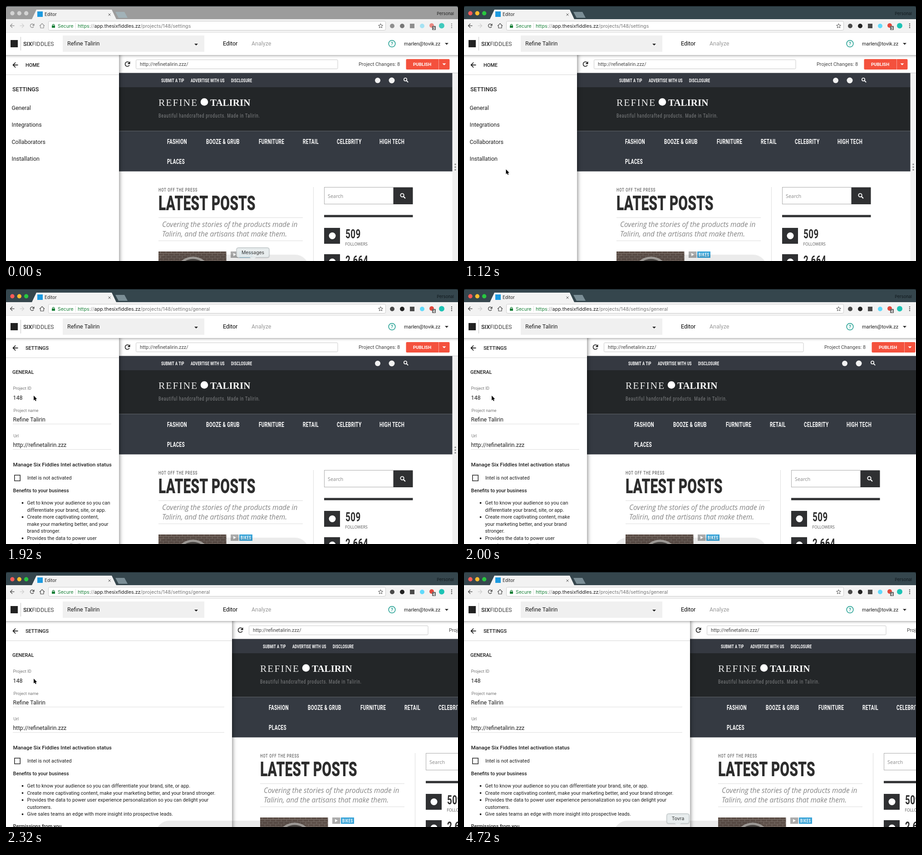
Write an HTML page with a canvas that moves like this. It is 996x562 px and loops after 5200 ms.

```html
<!DOCTYPE html>
<html lang="en">
<head>
<meta charset="utf-8">
<title>Editor settings</title>
<style>
html, body { margin: 0; width: 100%; height: 100%; overflow: hidden; background: #fff; }
canvas { display: block; }
</style>
</head>
<body>
<canvas id="stage" width="996" height="562"></canvas>
<script>
const W = 996, H = 562, LOOP = 5200, STEP = 80;
const ctx = document.getElementById('stage').getContext('2d');
const ROBOTO = 'Roboto, sans-serif', UI = 'Inter, sans-serif', OPEN = '"Open Sans", sans-serif';
const SERIF = '"Liberation Serif", serif';
const INK = '#1d1d1d', DARK = '#2f3032';
const NARROW = 0.67;          // proportion of the condensed display face
const BASE = 249, WIDE = 498; // sidebar widths

// ---- helpers ----
function rect(x, y, w, h, color) {
  ctx.fillStyle = color;
  ctx.fillRect(x, y, w, h);
}
function round(x, y, w, h, r, fill, stroke) {
  ctx.beginPath();
  ctx.roundRect(x, y, w, h, r);
  if (fill) { ctx.fillStyle = fill; ctx.fill(); }
  if (stroke) { ctx.strokeStyle = stroke; ctx.lineWidth = 1; ctx.stroke(); }
}
function dot(x, y, r, color) {
  ctx.beginPath();
  ctx.arc(x, y, r, 0, 7);
  ctx.fillStyle = color;
  ctx.fill();
}
function poly(points, color) {
  ctx.beginPath();
  points.forEach(([x, y]) => ctx.lineTo(x, y));
  ctx.closePath();
  ctx.fillStyle = color;
  ctx.fill();
}
function line(points, color, width = 1) {
  ctx.beginPath();
  points.forEach(([x, y]) => ctx.lineTo(x, y));
  ctx.strokeStyle = color;
  ctx.lineWidth = width;
  ctx.stroke();
}
function ring(x, y, r, color, width, from = 0, to = 7) {
  ctx.beginPath();
  ctx.arc(x, y, r, from, to);
  ctx.strokeStyle = color;
  ctx.lineWidth = width;
  ctx.stroke();
}
function text(str, x, y, size, color = INK, style = '400', family = ROBOTO, align = 'left') {
  ctx.font = `${style} ${size}px ${family}`;
  ctx.textAlign = align;
  ctx.fillStyle = color;
  ctx.fillText(str, x, y);
}
function spaced(gap, draw) {
  ctx.letterSpacing = gap + 'px';
  draw();
  ctx.letterSpacing = '0px';
}
function condensed(str, x, y, size, color, weight = '700', gap = 0) {
  ctx.save();
  ctx.translate(x, y);
  ctx.scale(NARROW, 1);
  spaced(gap, () => text(str, 0, 0, size, color, weight));
  ctx.restore();
}
function shadowed(blur, dx, dy, draw, alpha = 0.42) {
  ctx.save();
  ctx.shadowColor = `rgba(0,0,0,${alpha})`;
  ctx.shadowBlur = blur;
  ctx.shadowOffsetX = dx;
  ctx.shadowOffsetY = dy;
  draw();
  ctx.restore();
}
function shifted(dx, draw) {
  ctx.save();
  ctx.translate(dx, 0);
  draw();
  ctx.restore();
}
function caret(x, y, r, color) {
  poly([[x - r, y - r / 2], [x + r, y - r / 2], [x, y + r / 2]], color);
}
function arrow(x, y, r, color, width, dir = -1) {
  const tip = x + dir * r;
  line([[x - dir * r, y], [tip, y]], color, width);
  line([[x, y - r], [tip, y], [x, y + r]], color, width);
}
function reload(x, y, r, color, width) {
  ring(x, y, r, color, width, 0.5, 5.5);
  poly([[x + r + 1, y - r - 1], [x + r + 1, y], [x, y]], color);
}
function magnifier(x, y, r, color) {
  ring(x - 1, y - 1, r, color, r / 2);
  line([[x + r * 0.5, y + r * 0.5], [x + r * 1.6, y + r * 1.6]], color, r * 0.6);
}

// ---- motion ----
const path = [
  [320, 470, 535], [720, 107, 418], [880, 107, 418], [1520, 61, 235],
  [4080, 61, 235], [4160, 69, 235], [4640, 409, 545]
];
function pointer(t) {
  if (t < 320 || t > 4640) return null;
  const i = Math.max(1, path.findIndex(p => p[0] >= t));
  const [t0, x0, y0] = path[i - 1], [t1, x1, y1] = path[i];
  const u = (t - t0) / (t1 - t0), k = u * u * (3 - 2 * u);
  return { x: x0 + (x1 - x0) * k, y: y0 + (y1 - y0) * k };
}
// cubic-bezier(.4, 0, .2, 1)
function ease(u) {
  let lo = 0, hi = 1;
  for (let i = 0; i < 20; i++) {
    const s = (lo + hi) / 2, q = 1 - s;
    if (1.2 * q * q * s + 0.6 * q * s * s + s * s * s < u) lo = s; else hi = s;
  }
  return lo * lo * (3 - 2 * lo);
}
function sidebarWidth(t) {
  const u = Math.min(1, Math.max(0, (t - 1935) / 385));
  return Math.round(BASE + (WIDE - BASE) * ease(u));
}

// ---- browser window ----
function browser(active, general) {
  const icon = active ? '#4a4a4a' : '#8e8e8e';
  rect(0, 0, W, 29, '#10191d');
  round(0, 1, W, 40, 4, active ? '#35464d' : '#9c9c9c');
  const lights = active ? ['#fc5b57', '#fdbd2e', '#28c840'] : ['#d3d3d3', '#d3d3d3', '#d3d3d3'];
  lights.forEach((c, i) => dot(14 + i * 15.3, 16, 4.7, c));
  poly([[57, 29], [67, 8], [233, 8], [243, 29]], '#f2f2f2');
  poly([[241, 13], [261, 13], [268, 26], [248, 26]], active ? '#7b8e96' : '#a2b2b8');
  rect(69, 12, 12, 12, '#1b9ae0');
  text('Editor', 85, 22, 9.7, '#222', '400', UI);
  line([[225.5, 16.5], [230.5, 21.5]], '#555');
  line([[230.5, 16.5], [225.5, 21.5]], '#555');
  text('Personal', 987, 20, 9.2, active ? '#11191d' : '#222', '400', UI, 'right');

  rect(0, 29, W, 29, '#f2f2f2');
  arrow(14, 43.5, 4.5, icon, 1.3);
  arrow(35, 43.5, 4.5, '#cfcfcf', 1.3, 1);
  reload(57.5, 43.5, 4, icon, 1.3);
  line([[74, 44], [79.5, 38.5], [85, 44]], icon, 1.2);
  line([[76, 43], [76, 48.5], [83, 48.5], [83, 43]], icon, 1.2);
  round(93.5, 33.5, 743, 20, 3, '#fff', '#cbcbcb');
  rect(101, 43, 7, 5, '#188038');
  ring(104.5, 42.5, 2.2, '#188038', 1.2, Math.PI, 2 * Math.PI);
  text('Secure', 114, 48, 10.4, '#188038', '400', UI);
  rect(153, 37, 1, 13, '#ddd');
  const parts = [['https', '#188038'], ['://', '#888'], ['app.thesixfiddles.zz', INK],
    ['/projects/148/settings' + (general ? '/general' : ''), '#777']];
  let x = 158;
  for (const [str, color] of parts) {
    text(str, x, 48, 10.75, color, '400', UI);
    x += ctx.measureText(str).width;
  }
  ctx.beginPath();
  for (let i = 0; i < 10; i++) {
    const a = i * Math.PI / 5 - Math.PI / 2, r = i % 2 ? 2.3 : 5.2;
    ctx.lineTo(825.5 + r * Math.cos(a), 44 + r * Math.sin(a));
  }
  ctx.closePath();
  ctx.strokeStyle = '#555';
  ctx.lineWidth = 1;
  ctx.stroke();

  dot(851, 44, 5, icon);
  dot(873, 44, 5, active ? '#222' : '#777');
  rect(890, 39, 10, 10, icon);
  dot(917, 44, 5, active ? '#61dafb' : '#a5e2f3');
  dot(938, 43, 5, active ? '#e2483d' : '#ea8a83');
  round(939, 44, 8, 9, 1, '#666');
  text(general ? '4' : '3', 943, 51.5, 7.5, '#fff', '700', UI, 'center');
  dot(960, 43.5, 6, active ? '#1cc3b4' : '#40cabd');
  [39.5, 43.5, 47.5].forEach(y => dot(982, y, 1.2, icon));
}

function appHeader() {
  shadowed(6, 0, 1, () => rect(-10, 58, W + 20, 50, '#fff'));
  rect(0, 58, W, 1, '#e2e2e2');
  rect(10, 75, 16, 16, '#222');
  rect(32, 68, 1, 30, '#c4c4c4');
  text('SIX', 38, 88, 12.6, '#222', '500');
  text('FIDDLES', 38 + ctx.measureText('SIX').width, 88, 12.6, '#444');
  rect(125, 65, 312, 36, '#f0f0f0');
  text('Refine Talirin', 135, 87, 12.45);
  caret(419, 85, 4, '#222');
  text('Editor', 478, 87, 12.45, '#000');
  text('Analyze', 541, 87, 12.45, '#999');
  ring(850.5, 83, 7.3, '#159a8c', 1.5);
  text('?', 850.5, 87, 11, '#159a8c', '500', ROBOTO, 'center');
  text('marlen@tovik.zz', 877, 87, 10.9);
  caret(971, 83.5, 4, '#222');
}

// ---- preview ----
function previewBar(dx, far) {
  shifted(dx, () => reload(267.5, 128, 5, '#222', 1.7));
  round(286.5 + dx, 118.5, 444.5 + far - dx, 20, 2, '#fff', '#c9c9c9');
  text('http://refinetalirin.zzz/', 295 + dx, 132, 10.8, '#444');
  shifted(far, () => {
    text('Project Changes: 8', 777, 132, 10.9, '#444');
    round(881.5, 117, 96, 23, 2, '#f4513d');
    rect(953, 117, 1, 23, '#f9a399');
    text('PUBLISH', 917, 132, 9.8, '#fff', '700', ROBOTO, 'center');
    caret(965.5, 128.5, 4, '#fff');
  });
}

function photo() {
  ctx.save();
  ctx.beginPath();
  ctx.rect(336, 541, 149.5, 21);
  ctx.clip();
  rect(336, 541, 150, 21, '#5b4d46');
  for (let row = 0; row < 5; row++) {
    const y = 541 + row * 5;
    rect(336, y + 4, 150, 1, '#7b7069');
    for (let x = 340 + row % 2 * 6; x < 486; x += 12) rect(x, y, 1, 4, '#7b7069');
  }
  dot(412, 592, 38, '#4e4a47');
  ring(412, 592, 37, '#aaa6a2', 5);
  ctx.restore();
}

function site(mid, far) {
  const bars = [[147.5, 31.5, '#353941'], [179, 96.5, '#232628'], [275.5, 89, '#353a42']];
  rect(BASE, 147.5, W - BASE, H - 147.5, '#fff');
  bars.forEach(([y, h, c]) => rect(BASE, y, W - BASE, h, c));
  shifted(mid, () => {
    const links = [['SUBMIT A TIP', 342], ['ADVERTISE WITH US', 407], ['DISCLOSURE', 496]];
    links.forEach(([label, x]) => condensed(label, x, 168, 11.4, '#fff', '700', 0.2));
    dot(819, 164, 6, '#f2f2f2');
    dot(850, 164, 6.5, '#f2f2f2');
    magnifier(881, 163, 3.2, '#fff');

    spaced(2, () => text('REFINE', 336, 220, 21.5, '#eee', '400', SERIF));
    dot(437, 211.5, 8.3, '#fff');
    text('TALIRIN', 450, 220, 21, '#fff', '700', SERIF);
    condensed('Beautiful handcrafted products. Made in Talirin.', 336, 246, 13, '#707274', '500', 1.2);

    const menu = [['FASHION', 355], ['BOOZE & GRUB', 441], ['FURNITURE', 557],
      ['RETAIL', 654], ['CELEBRITY', 729], ['HIGH TECH', 823]];
    menu.forEach(([label, x]) => condensed(label, x, 303.5, 15, '#fff', '700', 0.5));
    condensed('PLACES', 355, 348, 15, '#fff', '700', 0.5);

    condensed('HOT OFF THE PRESS', 336, 409, 11.5, '#666', '500', 1.2);
    condensed('LATEST POSTS', 336, 449.5, 45, '#2d2d2d', '900');
    rect(336, 466, 318, 1, '#ddd');
    rect(336, 517, 318, 1, '#ddd');
    text('Covering the stories of the products made in', 344, 487, 15.4, '#858585', 'italic 400', OPEN);
    text('Talirin, and the artisans that make them.', 344, 508, 15.4, '#858585', 'italic 400', OPEN);
    photo();
    rect(495, 541, 17.5, 14, '#ababab');
    poly([[501, 544.5], [507, 548], [501, 551.5]], '#fff');
    rect(514, 541, 29, 14, '#39a4d8');
    condensed('BIKES', 517, 552, 10.5, '#fff', '700', 1.3);

    rect(677, 399, 1, H - 399, '#ddd');
    ctx.strokeStyle = '#aaa';
    ctx.lineWidth = 1;
    ctx.strokeRect(701.5, 399.5, 194, 37);
    text('Search', 709, 423, 10.9, '#888', '400', OPEN);
    rect(853.5, 400, 43, 37, DARK);
    magnifier(874, 418, 3.7, '#fff');
    rect(701, 460.5, 195.5, 5, DARK);
    rect(701, 489, 35, 35, DARK);
    dot(719, 506.5, 7.5, '#fff');
    condensed('509', 748, 511.5, 28, '#2d2d2d', '700', 0.8);
    text('FOLLOWERS', 747.5, 528, 8.6, '#555', '400', OPEN);
    rect(701, 547, 35, 35, DARK);
    dot(719, 564, 7.5, '#fff');
    condensed('2,664', 748, 570, 28, '#2d2d2d', '700', 0.8);
  });
  shifted(far, () => {
    rect(983.5, 147.5, 300, H - 147.5, '#f1f1f1');
    [349, 355, 361].forEach(y => dot(990, y, 1.7, '#888'));
  });
}

// ---- sidebar ----
const menuItems = ['General', 'Integrations', 'Collaborators', 'Installation'];
const benefits = [
  'Get to know your audience so you can differentiate your brand, site, or app.',
  'Create more captivating content, make your marketing better, and your brand stronger.',
  'Provides the data to power user experience personalization so you can delight your customers.',
  'Give sales teams an edge with more insight into prospective leads.'
];

function wrap(str, width) {
  const lines = [''];
  for (const word of str.split(' ')) {
    const last = lines[lines.length - 1], next = last ? last + ' ' + word : word;
    if (last && ctx.measureText(next).width > width) lines.push(word);
    else lines[lines.length - 1] = next;
  }
  return lines;
}

function settingsMenu(hover) {
  text('SETTINGS', 14, 188, 12.45, INK, '500');
  menuItems.forEach((label, i) => {
    if (i === hover) rect(0, 206 + i * 37.4, BASE, 37.4, '#ebebeb');
    text(label, 12.5, 229 + i * 37.4, 12.45);
  });
}

function generalForm(w) {
  const right = w - 17;
  text('GENERAL', 14, 187, 10.9, INK, '500');
  text('Project ID', 15.5, 222, 9.34, '#777');
  text('148', 15.5, 244, 12.45);
  text('Project name', 16.5, 271, 9.34, '#777');
  text('Refine Talirin', 15.5, 292, 12.45);
  rect(15, 297, right - 15, 1, '#dedede');
  text('Url', 16.5, 327, 9.34, '#777');
  text('http://refinetalirin.zzz', 15.5, 348, 12.45);
  rect(15, 353, right - 15, 1, '#dedede');
  text('Manage Six Fiddles Intel activation status', 15.5, 391, 11.67, INK, '500');
  ctx.strokeStyle = '#333';
  ctx.lineWidth = 1.6;
  ctx.strokeRect(18.8, 410.3, 12.4, 12.4);
  text('Intel is not activated', 47, 420, 10.9);
  text('Benefits to your business', 15.5, 448, 10.9, INK, '500');
  let y = 475;
  for (const item of benefits) {
    dot(36.5, y - 3.5, 1.9, INK);
    ctx.font = `400 10.9px ${ROBOTO}`;
    for (const str of wrap(item, right - 46)) {
      text(str, 46.5, y, 10.9);
      y += 15.6;
    }
  }
  text('Permissions from you', 15.5, y + 10.5, 10.9, INK, '500');
}

function sidebar(w, general, hover) {
  shadowed(9, 1, 0, () => rect(-10, 100, w + 10, H, '#fff'), 0.5);
  ctx.save();
  ctx.beginPath();
  ctx.rect(0, 100, w, H);
  ctx.clip();
  arrow(21, 130, 5.5, '#111', 1.7);
  text(general ? 'SETTINGS' : 'HOME', 43, 134, 10.9, INK, '500');
  rect(0, 151, w, 1, '#d6d6d6');
  if (general) generalForm(w); else settingsMenu(hover);
  ctx.restore();
}

// ---- overlays ----
function tooltip(label, x) {
  const fill = 'rgba(234,239,240,.93)';
  ctx.font = `400 10.4px ${UI}`;
  const half = ctx.measureText(label).width / 2 + 11;
  shadowed(2, 0, 1, () => {
    round(x - half, 532.5, half * 2, 21.5, 4, fill, '#bcc4c6');
  }, 0.15);
  poly([[x - 7, 553.5], [x + 7, 553.5], [x, 560]], fill);
  text(label, x, 547, 10.4, '#333', '400', UI, 'center');
}

function cursor(x, y, hand) {
  ctx.save();
  ctx.translate(x, y);
  ctx.lineJoin = 'round';
  const shape = hand
    ? [[-1, 2], [1, 2], [1.3, 6], [6, 7], [7, 9], [5.5, 15], [0, 15], [-4, 10], [-3.5, 8.5], [-1, 10]]
    : [[0, 0], [0, 10.5], [2.4, 8.4], [4, 12], [5.8, 11.2], [4.2, 7.7], [7.3, 7.5]];
  ctx.beginPath();
  shape.forEach(([px, py]) => ctx.lineTo(px, py));
  ctx.closePath();
  ctx.strokeStyle = hand ? '#222' : '#fff';
  ctx.lineWidth = hand ? 1.2 : 1.8;
  ctx.fillStyle = hand ? '#fff' : '#000';
  ctx.stroke();
  ctx.fill();
  ctx.restore();
}

function draw(t) {
  const general = t >= 1840, active = t >= 800, p = pointer(t);
  // The preview narrows as the sidebar grows, so its centre and far edge move less.
  const w = sidebarWidth(t), dx = w - BASE;
  const mid = Math.round(dx * 0.9), far = Math.floor(dx * 0.8);
  const row = p && active && !general && p.x < BASE ? Math.floor((p.y - 206) / 37.4) : -1;
  const hover = row < menuItems.length ? row : -1;

  rect(0, 0, W, H, '#fff');
  previewBar(dx, far);
  site(mid, far);
  sidebar(w, general, hover);
  appHeader();
  browser(active, general);
  round(330, 548, 337, 60, 30, 'rgba(0,0,0,.08)');
  if (t < 320) tooltip('Messages', 544);
  if (t >= 4720) tooltip('Tovra', 471.5);
  if (p) cursor(p.x, p.y, hover >= 0);
}

function tick(now) {
  draw(Math.floor(now % LOOP / STEP) * STEP);
  requestAnimationFrame(tick);
}
draw(0);
requestAnimationFrame(tick);
</script>
</body>
</html>
```
